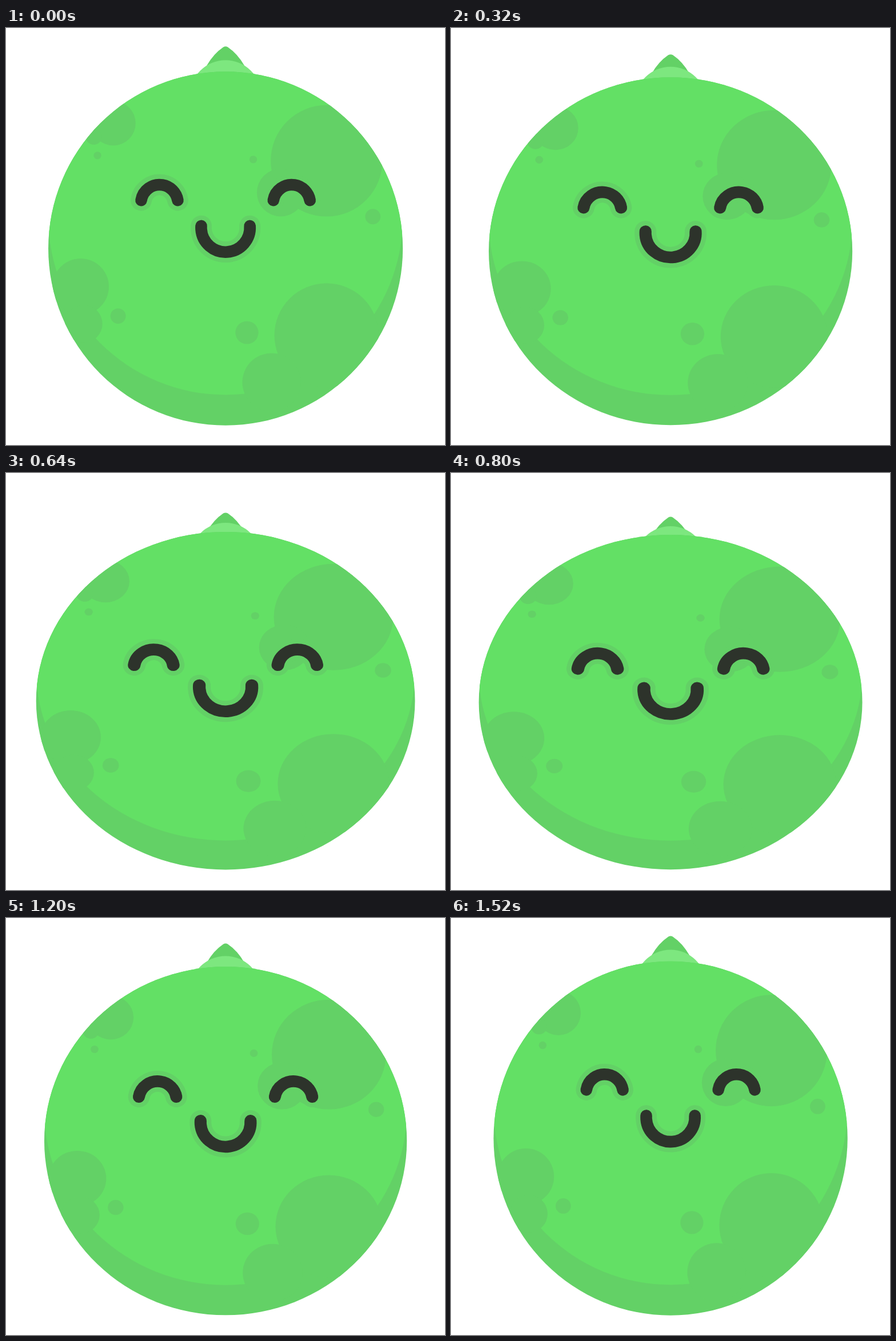
Animation, 768 px wide and 729 px high, one loop 1560 ms. Source, as an HTML page with a canvas:

```html
<!DOCTYPE html>
<html lang="en">
<head>
<meta charset="utf-8">
<title>Squishy lime</title>
<style>
  html, body { margin: 0; width: 100%; height: 100%; overflow: hidden; background: #fff; }
  canvas { display: block; }
</style>
</head>
<body>
<canvas id="stage" width="768" height="729"></canvas>
<script>
const ctx = document.getElementById('stage').getContext('2d');
const LIGHT = '#63e065', DARK = '#63d166', PALE = '#7de77f', INK = '#2d332b';
const LOOP = 1560, STEP = 40;
const CX = 384.1, CY = 385.2, RADIUS = 309.6;

// Slow start, abrupt turn at the bottom, soft return. 0 = round, about 1.09 = flattest.
function squash(t) {
  const lead = 60, turn = 762, end = 1530;
  const u = t < turn ? (t + lead) / (turn + lead) : Math.max(0, end - t) / (end - turn);
  return 1.095 * Math.pow(u, 1.55);
}

function disc(x, y, r, color) {
  ctx.fillStyle = color;
  ctx.beginPath();
  ctx.arc(x, y, r, 0, Math.PI * 2);
  ctx.fill();
}

function drawStem(k) {
  ctx.save();
  ctx.translate(CX, 31 + 44.5 * k);
  ctx.fillStyle = DARK;
  ctx.beginPath();
  ctx.moveTo(0, 50);
  ctx.lineTo(-33, 34);
  ctx.quadraticCurveTo(-21, 13, -4, 1.6);
  ctx.quadraticCurveTo(0, -0.8, 4, 1.6);
  ctx.quadraticCurveTo(21, 13, 33, 34);
  ctx.fill();
  ctx.restore();
  disc(CX, 118 + 37 * k, 62.5, PALE);
}

// A crater with a smaller one leaning on it at offset (dx, dy).
function craterPair(x, y, r, dx, dy, smallR) {
  disc(x, y, r, DARK);
  disc(x + dx, y + dy, smallR, DARK);
}

function drawCraters() {
  // The right side is nearly mirrored: the lower pair is tighter but its small crater larger.
  for (const side of [-1, 1]) {
    craterPair(CX + 176.4, CY - 0.8 + 152.7 * side, 94.3 - 3.2 * side,
      -88 - 8 * side, 69 + 13.3 * side, 46.4 + 4.7 * side);
  }
  craterPair(188, 166, 39, -34, 23.5, 14);
  craterPair(131, 452, 49.3, 5, 65, 33);

  // Pebbles grow from top to bottom.
  const pebbles = [[160, 222], [432, 229], [641, 329], [196, 503], [421, 532]];
  pebbles.forEach(([x, y], i) => disc(x + 0.4, y + 0.4, 6.7 * (1 + (i >> 1)), DARK));
}

function drawBody(k) {
  const pivotY = 666.4;
  ctx.save();
  ctx.translate(CX, pivotY);
  ctx.scale(1 + 0.0825 * k, 1 - 0.0542 * k);
  ctx.translate(-CX, -pivotY);
  disc(CX, CY, RADIUS, DARK);
  ctx.clip();
  disc(CX, CY - 53.5, RADIUS, LIGHT);
  drawCraters();
  ctx.restore();
}

function drawArc(x, y, scaleX, r, from, to, width, color) {
  ctx.save();
  ctx.translate(x, y);
  ctx.scale(scaleX, 1);
  ctx.beginPath();
  ctx.arc(0, 0, r, from, to);
  ctx.lineCap = 'round';
  ctx.lineWidth = width;
  ctx.strokeStyle = color;
  ctx.stroke();
  ctx.restore();
}

function drawFace(k) {
  const eyeX = 115.4 + 12 * k, eyeY = 305.5 + 41.5 * k, mouthY = 348.5 + 30 * k;
  for (const [width, color] of [[36.8, DARK], [20.6, INK]]) {
    for (const side of [-1, 1]) {
      drawArc(CX + side * eyeX, eyeY, 1 + 0.085 * k, 32.3,
        Math.PI + 0.16, Math.PI * 2 - 0.16, width, color);
    }
    drawArc(CX, mouthY, 1 + 0.095 * k, 42.6, -0.07, Math.PI + 0.07, width, color);
  }
}

function render(now) {
  const t = Math.floor((now % LOOP) / STEP) * STEP;
  const k = squash(t);
  ctx.fillStyle = '#fff';
  ctx.fillRect(0, 0, 768, 729);
  drawStem(k);
  drawBody(k);
  drawFace(k);
}

const start = performance.now();
function tick() {
  render(performance.now() - start);
  requestAnimationFrame(tick);
}
tick();
</script>
</body>
</html>
```
